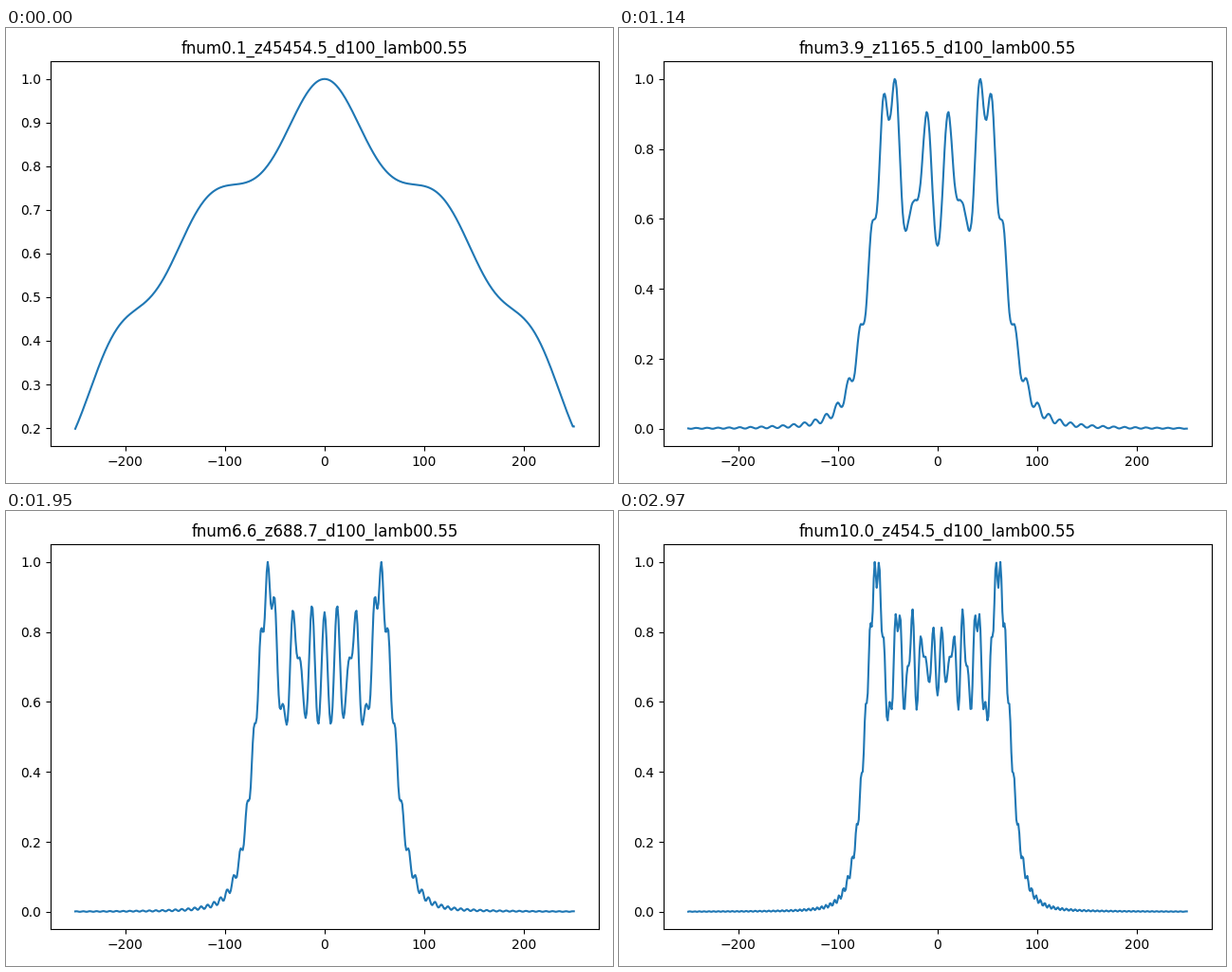
Recreate the animation shown at these times as a matplotlib script. Size 640 by 480 pixels, loop 3000 ms.

```python
import numpy as np
import matplotlib.pyplot as plt
from matplotlib.animation import FuncAnimation

WAVELENGTH = 0.55   # um
SLIT = 100          # um
WINDOW = 3 * SLIT   # visible width, um
SAMPLES = 500
FRAMES = 100

step = WINDOW / SAMPLES
padded = 2 * SAMPLES
grid = np.arange(-SAMPLES, SAMPLES) * step
freq = np.fft.fftfreq(padded, step)
slit_spectrum = np.fft.fft(np.fft.ifftshift(np.abs(grid) <= SLIT / 2))
pixels = np.arange(-SAMPLES // 2, SAMPLES // 2 + 1)


def profile(z):
    """Band-limited angular spectrum propagation, peak scaled to 1."""
    limit = 1 / (WAVELENGTH * np.hypot(2 * z / (padded * step), 1))
    transfer = np.exp(2j * np.pi * z * np.sqrt(1 / WAVELENGTH**2 - freq**2))
    transfer[np.abs(freq) > limit] = 0
    field = np.fft.fftshift(np.fft.ifft(slit_spectrum * transfer))
    half = SAMPLES // 2
    light = np.abs(field[half:half + SAMPLES]) ** 2
    return np.append(light, light[-1]) / light.max()


fig, ax = plt.subplots(figsize=(6.4, 4.8), dpi=100)
line, = ax.plot([], [])


def update(i):
    number = (i + 1) / 10
    z = (SLIT / 2) ** 2 / (WAVELENGTH * number)
    line.set_data(pixels, profile(z))
    ax.relim()
    ax.autoscale_view()
    ax.set_title(f"fnum{number:.1f}_z{z:.1f}_d{SLIT}_lamb0{WAVELENGTH:.2f}")
    return line,


update(0)
fig.tight_layout()
fig.subplots_adjust(top=1 - 35.33 / 480)
anim = FuncAnimation(fig, update, frames=FRAMES, interval=30, repeat=True)
plt.show()
```
